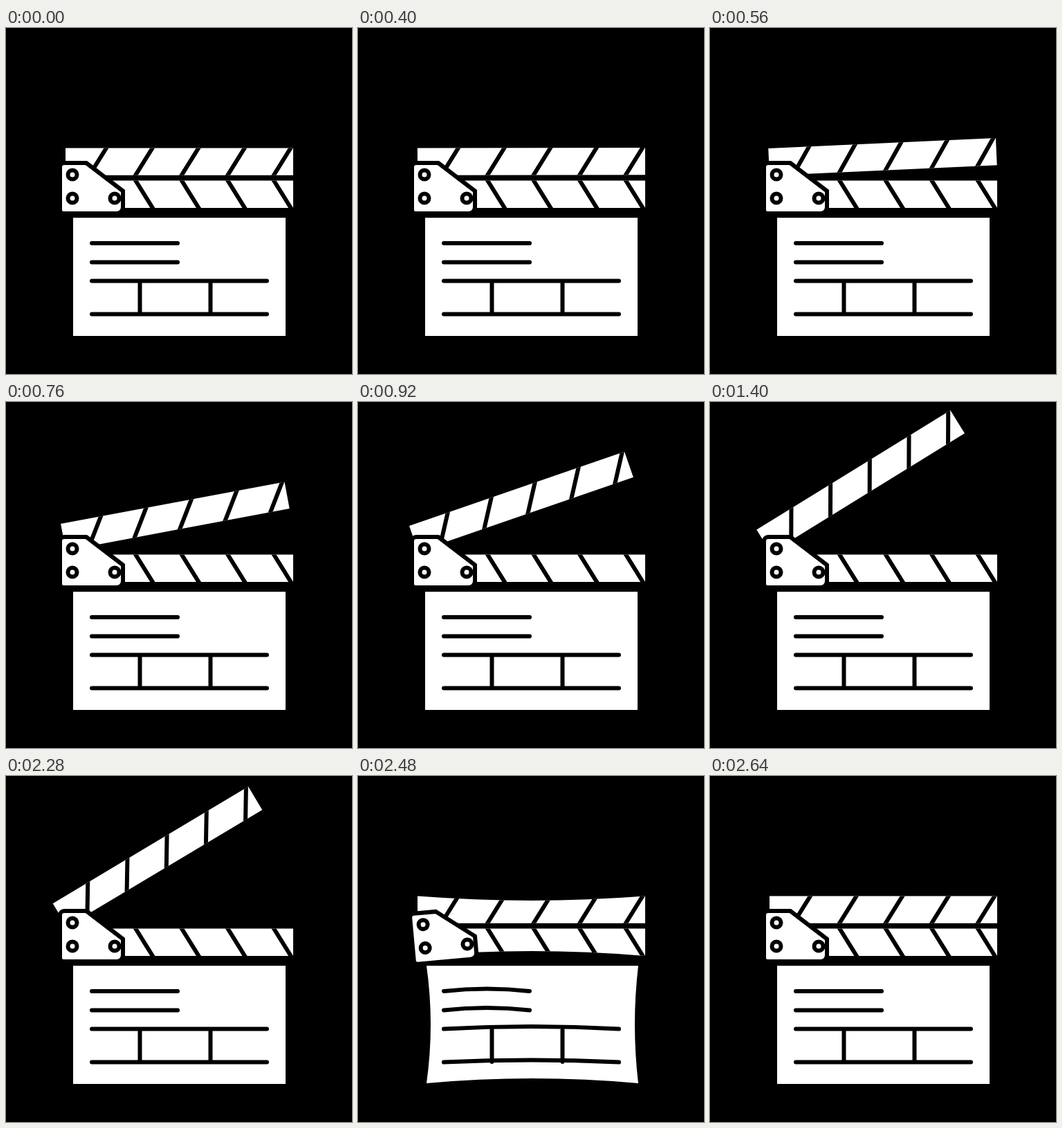
Recreate the animation shown at these times as an HTML page with a canvas. Size 500 px wide and 500 px high, loop 3.6 s.

```html
<!DOCTYPE html>
<html lang="en">
<head>
<meta charset="utf-8">
<title>Clapperboard</title>
<style>
  html, body { margin: 0; width: 100%; height: 100%; overflow: hidden; background: #000; }
  canvas { display: block; width: 500px; height: 500px; }
</style>
</head>
<body>
<canvas id="stage" width="500" height="500"></canvas>
<script>
const ctx = document.getElementById('stage').getContext('2d');
const LOOP = 3600, STEP = 40;
const OPEN_ANGLE = 31.65 * Math.PI / 180;
const TILT = 5.2 * Math.PI / 180;
const HINGE = [96, 212];

const clamp = v => Math.min(1, Math.max(0, v));
const progress = (t, from, to) => clamp((t - from) / (to - from));
const mix = (a, b, k) => a + (b - a) * k;
const smooth = k => (1 - Math.cos(Math.PI * k)) / 2;

// Cubic Bezier easing with flat ends and handles at x1 and x2.
function ease(x, x1, x2) {
  let lo = 0, hi = 1;
  for (let i = 0; i < 24; i++) {
    const s = (lo + hi) / 2, r = 1 - s;
    if (3 * r * r * s * x1 + 3 * r * s * s * x2 + s * s * s < x) lo = s; else hi = s;
  }
  return lo * lo * (3 - 2 * lo);
}

function armAngle(t) {
  if (t < 2240) return OPEN_ANGLE * ease(progress(t, 360, 1400), 0.403, 0.544);
  return OPEN_ANGLE * (1 - progress(t, 2240, 2440) ** 2.3);
}

// Impact wobble: 1 is the full pinch, negative values bulge outwards.
function wobble(t) {
  if (t < 2480) return smooth(progress(t, 2440, 2480));
  if (t < 2560) return mix(1, -0.38, smooth(progress(t, 2480, 2560)));
  return mix(-0.38, 0, smooth(progress(t, 2560, 2640)));
}

function rotateAbout(x, y, angle) {
  ctx.translate(x, y);
  ctx.rotate(angle);
  ctx.translate(-x, -y);
}

// Four-sided shape whose edges bow by [top, right, bottom, left] pixels.
function bowedQuad(corners, [top, right, bottom, left]) {
  const bows = [[0, top], [right, 0], [0, bottom], [left, 0]];
  ctx.beginPath();
  ctx.moveTo(...corners[0]);
  bows.forEach(([dx, dy], i) => {
    const [ax, ay] = corners[i], [bx, by] = corners[(i + 1) % 4];
    ctx.quadraticCurveTo((ax + bx) / 2 + 2 * dx, (ay + by) / 2 + 2 * dy, bx, by);
  });
  ctx.closePath();
}

function line(x1, y1, x2, y2, bow = 0) {
  ctx.beginPath();
  ctx.moveTo(x1, y1);
  ctx.quadraticCurveTo((x1 + x2) / 2, (y1 + y2) / 2 + 2 * bow, x2, y2);
  ctx.stroke();
}

function strip(top, bottom, bows, lean) {
  ctx.save();
  bowedQuad([[86, top], [415, top], [415, bottom], [86, bottom]], bows);
  ctx.fill();
  ctx.clip();
  for (let i = 0; i < 5; i++) {
    const x = 118.2 + 66.6 * i;
    line(x, 216.5, x + 31.1, 216.5 + lean * 50);
  }
  ctx.restore();
}

function board(p) {
  const l = 97 + 2 * p, r = 404 + p, b = 445 - p;
  bowedQuad([[l, 274.3], [r, 274.3], [r, b], [l, b]], [0, -5 * p, -7 * p, 6 * p]);
  ctx.fill();
  line(124, 311, 248, 311, -3.5 * p);
  line(124, 338.5, 248, 338.5, -3.5 * p);
  line(124, 365.5, 377, 365.5, -3.5 * p);
  line(124, 413.5, 377, 413.5, -3 * p);
  line(193.5, 367, 193.5, 413);
  line(295.5, 367, 295.5, 413);
}

function plate(p) {
  ctx.save();
  rotateAbout(124.5, 234, -TILT * p);
  ctx.beginPath();
  ctx.moveTo(116, 195);
  ctx.lineTo(169, 235.5);
  ctx.arcTo(169, 268, 78, 268, 9);
  ctx.arcTo(78, 268, 78, 195, 5);
  ctx.arcTo(78, 195, 116, 195, 6);
  ctx.closePath();
  ctx.fill();
  ctx.stroke();
  for (const [x, y] of [HINGE, [96, 246], [157, 246]]) {
    ctx.beginPath();
    ctx.arc(x, y, 6.5, 0, 2 * Math.PI);
    ctx.stroke();
  }
  ctx.restore();
}

function draw(t) {
  const p = wobble(t);
  ctx.fillStyle = '#000';
  ctx.fillRect(0, 0, 500, 500);
  ctx.fillStyle = '#fff';
  ctx.strokeStyle = '#000';
  ctx.lineWidth = 6;
  ctx.lineCap = 'round';

  board(p);
  strip(220.5, 260, [0, 0, -7 * p, 0], 1);
  ctx.save();
  rotateAbout(...HINGE, -armAngle(t));
  strip(173.6, 212.8, [6.3 * p, 0, 0, 0], -1);
  ctx.restore();
  plate(p);
}

const start = performance.now();
function tick() {
  const t = (performance.now() - start) % LOOP;
  draw(Math.floor(t / STEP) * STEP);
  requestAnimationFrame(tick);
}
tick();
</script>
</body>
</html>
```
